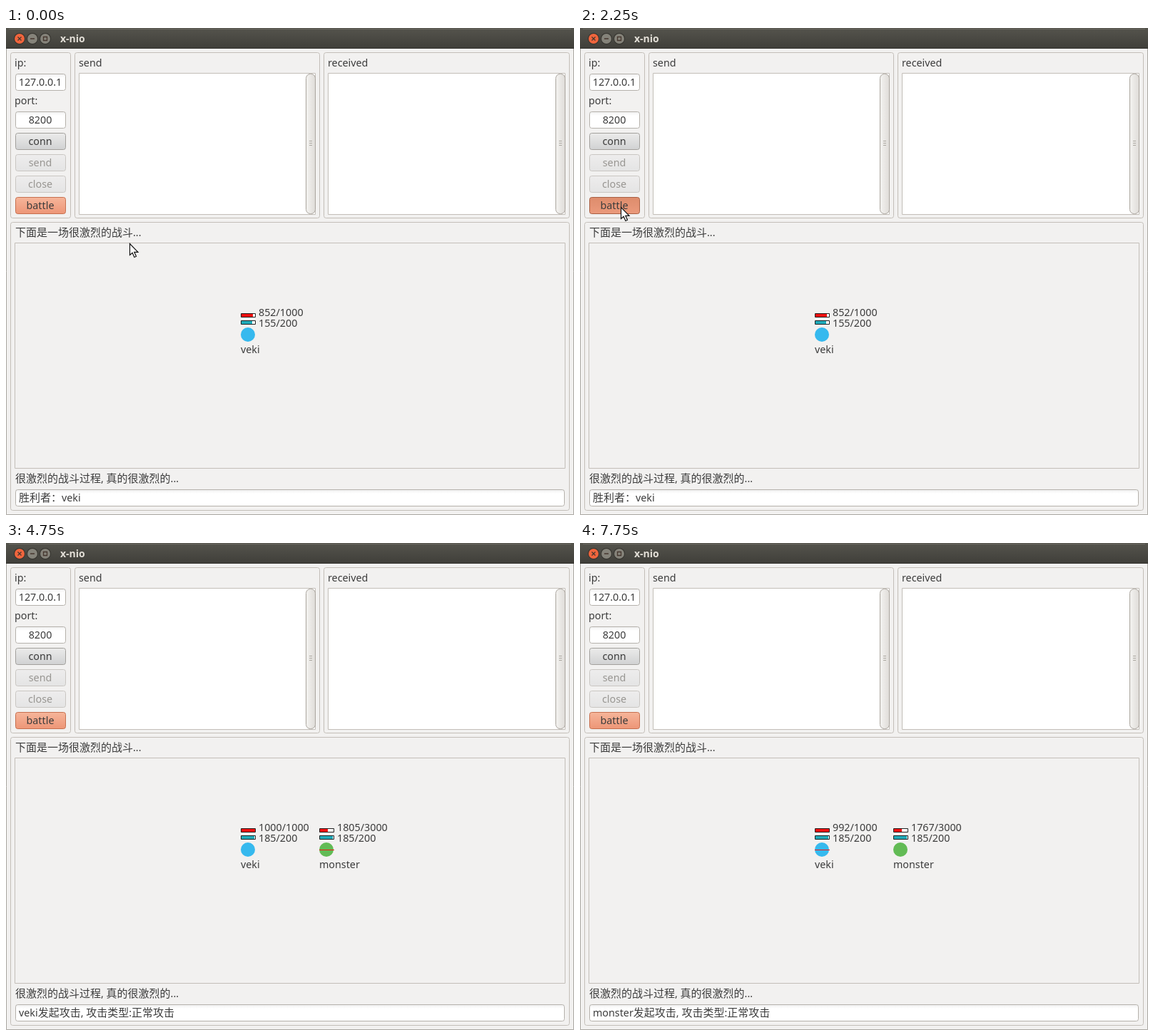
An HTML page with a canvas for the animation above (8 s loop, 796 by 683 pixels).

```html
<!DOCTYPE html>
<html lang="zh">
<head>
<meta charset="utf-8">
<style>
html, body { margin: 0; width: 100%; height: 100%; overflow: hidden; background: #f2f1f0; }
canvas { display: block; }
</style>
</head>
<body>
<canvas id="stage" width="796" height="683"></canvas>
<script>
const ctx = document.getElementById('stage').getContext('2d');
const LOOP = 8000, TAU = Math.PI * 2, HERO = 'veki';
const INK = '#3c3c3c', LINE = '#c3beb8';
const LATIN = '14.3px "Noto Sans", "Open Sans", sans-serif';
const HAN = '15px "Noto Sans CJK SC", "Noto Sans CJK", sans-serif';

const NORMAL = ['#f6b69b', '#ed9576', '#c6704f'];
const HOVER = ['#fbc0a6', '#f5a283', '#cc7a5a'];
const PRESSED = ['#dd8c6c', '#eb9a7c', '#a85f43'];
const PLAIN = ['#ececeb', '#d0d1d2', '#a2a09c'];
const DISABLED = ['#eeeded', '#e4e4e4', '#c9c6c2'];

// Each list is [start time, value]; a value holds until the next start.
const cursorSteps = [[0, [173, 302]], [250, [183, 40]], [500, [208, 9]], [750, [210, 8]],
  [1000, [71, 219]], [1250, [64, 250]], [2250, [57, 251]], [2500, null]];
const buttonSteps = [[0, NORMAL], [750, PLAIN], [1000, NORMAL], [1250, HOVER],
  [1500, PRESSED], [3500, HOVER], [3750, NORMAL]];
const strike = who => who + '发起攻击, 攻击类型:正常攻击';
const battleSteps = [
  [0, { hp: 852, mp: 155, log: '胜利者：' + HERO }],
  [3750, { hp: 1000, mp: 185, foe: 1843, hit: 'hero', storm: true, log: strike('monster') + '  技能id:7' }],
  [4750, { hp: 1000, mp: 185, foe: 1805, hit: 'foe', log: strike(HERO) }],
  [5750, { hp: 996, mp: 185, foe: 1805, hit: 'hero', log: strike('monster') }],
  [6750, { hp: 996, mp: 185, foe: 1767, hit: 'foe', log: strike(HERO) }],
  [7750, { hp: 992, mp: 185, foe: 1767, hit: 'hero', log: strike('monster') }]
];
const at = (steps, t) => steps.filter(s => s[0] <= t).pop()[1];

function text(str, x, y, color = INK, align = 'left') {
  ctx.fillStyle = color;
  const runs = str.match(/[\u3000-\uffef]+|[^\u3000-\uffef]+/g).map(run => {
    const font = run.charCodeAt(0) >= 0x3000 ? HAN : LATIN;
    ctx.font = font;
    return { run, font, width: ctx.measureText(run).width };
  });
  if (align === 'center') x -= runs.reduce((sum, r) => sum + r.width, 0) / 2;
  for (const { run, font, width } of runs) {
    ctx.font = font;
    ctx.fillText(run, x, y);
    x += width;
  }
}

function box(x, y, w, h, r, fill, stroke) {
  ctx.beginPath();
  ctx.roundRect(x + .5, y + .5, w - 1, h - 1, r);
  if (fill) { ctx.fillStyle = fill; ctx.fill(); }
  if (stroke) { ctx.strokeStyle = stroke; ctx.lineWidth = 1; ctx.stroke(); }
}

function gradient(x0, y0, x1, y1, ...colors) {
  const g = ctx.createLinearGradient(x0, y0, x1, y1);
  colors.forEach((c, i) => g.addColorStop(i / (colors.length - 1), c));
  return g;
}

function disc(x, y, r, color) {
  ctx.beginPath();
  ctx.arc(x, y, r, 0, TAU);
  ctx.fillStyle = color;
  ctx.fill();
}

function button(label, y, [top, bottom, edge], color = INK) {
  box(13, y, 71, 24, 3, gradient(0, y, 0, y + 24, top, bottom), edge);
  text(label, 48, y + 17, color, 'center');
}

function entry(x, y, w, h) {
  box(x, y, w, h, 3, gradient(0, y, 0, y + 6, '#eeeeee', '#ffffff'), '#b5b1ab');
}

function titleBar(focused) {
  ctx.fillStyle = gradient(0, 0, 0, 28, '#55544d', '#403f3a');
  ctx.fillRect(0, 0, 796, 29);
  ctx.fillStyle = '#6b6962';
  ctx.fillRect(4, 1, 788, 1);
  ctx.fillStyle = '#34332f';
  ctx.fillRect(0, 28, 796, 1);
  [19, 37, 55].forEach((x, i) => {
    disc(x, 15, 8, '#34332e');
    disc(x, 15, 7, i || !focused ? '#85837a' : '#f0653d');
  });
  ctx.strokeStyle = '#45372f';
  ctx.lineWidth = 1.3;
  ctx.beginPath();
  ctx.moveTo(16.5, 12.5); ctx.lineTo(21.5, 17.5);
  ctx.moveTo(21.5, 12.5); ctx.lineTo(16.5, 17.5);
  ctx.moveTo(34, 15); ctx.lineTo(40, 15);
  ctx.rect(52.5, 12.5, 5, 5);
  ctx.stroke();
  ctx.font = 'bold 14px "Noto Sans", "Open Sans", sans-serif';
  ctx.fillStyle = focused ? '#e3dfd7' : '#98958c';
  ctx.fillText('x-nio', 76, 20);
}

function textArea(label, x, w) {
  box(x - 6, 34, w + 12, 233, 3, null, LINE);
  text(label, x, 54);
  box(x, 63, w, 199, 0, '#ffffff', LINE);
  const bar = x + w - 14;
  box(bar, 64, 14, 197, 6, gradient(bar, 0, bar + 14, 0, '#f5f4f2', '#dedbd7'), '#aaa59e');
  ctx.fillStyle = '#aaa69f';
  for (let y = 158; y < 166; y += 3) ctx.fillRect(bar + 5, y, 4, 1);
}

function gauge(x, y, ratio, color) {
  box(x, y, 21, 6, 0, '#ffffff', '#222222');
  ctx.fillStyle = color;
  ctx.fillRect(x + 1, y + 1, Math.round(19 * ratio), 4);
}

function fighter(x, name, hp, maxHp, mp, color, hit) {
  gauge(x, 400, hp / maxHp, '#f01010');
  gauge(x, 410, mp / 200, '#1fabba');
  text(hp + '/' + maxHp, x + 25, 404);
  text(mp + '/200', x + 25, 419);
  disc(x + 10, 430, 10, color);
  if (hit) {
    ctx.fillStyle = '#f01818';
    ctx.fillRect(x, 430, 21, 1);
  }
  text(name, x, 456);
}

function cursor(x, y) {
  ctx.save();
  ctx.translate(x + .5, y + .5);
  ctx.beginPath();
  [[0, 0], [0, 16], [3.6, 12.8], [6.4, 19], [9, 17.8], [6.3, 11.8], [11.5, 11.8]]
    .forEach(p => ctx.lineTo(...p));
  ctx.closePath();
  ctx.fillStyle = '#ffffff';
  ctx.strokeStyle = '#111111';
  ctx.lineWidth = 1.2;
  ctx.fill();
  ctx.stroke();
  ctx.restore();
}

function paintStorm() {
  const layer = document.createElement('canvas');
  layer.width = 340;
  layer.height = 604;
  const g = layer.getContext('2d');
  let seed = 7;
  const rnd = (a, b) => {
    seed = (seed * 16807) % 2147483647;
    return a + (b - a) * seed / 2147483647;
  };
  const glow = (x, y, rx, ry, ...stops) => {
    g.save();
    g.translate(x, y);
    g.scale(rx, ry);
    const fill = g.createRadialGradient(0, 0, 0, 0, 0, 1);
    stops.forEach((c, i) => fill.addColorStop(i / (stops.length - 1), c));
    g.fillStyle = fill;
    g.fillRect(-1, -1, 2, 2);
    g.restore();
  };
  const arc = (x, y, rx, ry, turn, from, to, color, width) => {
    g.beginPath();
    g.ellipse(x, y, rx, ry, turn, from, to);
    g.strokeStyle = color;
    g.lineWidth = width;
    g.stroke();
  };
  // A band that is widest at the front and thins out toward its ends.
  const band = (x, y, rx, ry, turn, from, to, width) => {
    g.beginPath();
    g.ellipse(x, y, rx, ry, turn, from, to);
    g.ellipse(x, y - width * .4, rx - width, ry - width * .5, turn, to, from, true);
    g.closePath();
    g.shadowColor = '#5548ff';
    g.shadowBlur = 9;
    g.fillStyle = 'rgba(240,240,255,.9)';
    g.fill();
    g.shadowBlur = 0;
  };

  glow(172, 557, 151, 58, '#35c8ff', '#1e9cff', '#1264ff', '#0d42ff', '#1540ff', 'rgba(30,70,255,0)');

  g.filter = 'blur(4px)';
  g.fillStyle = 'rgba(30,88,222,.85)';
  g.beginPath();
  [[48, 350], [95, 331], [160, 320], [205, 322], [258, 313], [318, 319], [325, 338],
    [296, 362], [267, 381], [242, 407], [105, 397], [72, 375]].forEach(p => g.lineTo(...p));
  g.fill();
  const body = g.createLinearGradient(0, 340, 0, 550);
  ['#1c57de', '#2a78ea', '#45b2fa', '#259bf4', '#47baff', 'rgba(50,190,255,.5)']
    .forEach((c, i) => body.addColorStop(i / 5, c));
  g.fillStyle = body;
  g.beginPath();
  g.moveTo(96, 355);
  g.bezierCurveTo(114, 385, 84, 420, 95, 450);
  g.bezierCurveTo(110, 485, 125, 510, 118, 545);
  g.lineTo(225, 545);
  g.bezierCurveTo(212, 500, 245, 475, 239, 430);
  g.bezierCurveTo(229, 400, 248, 380, 253, 350);
  g.fill();
  g.filter = 'none';

  for (let i = 0; i < 85; i++) {
    const x = rnd(32, 190), y = 348 + rnd(-30, 26) * (x / 190), len = rnd(60, 140);
    g.beginPath();
    g.moveTo(x, y);
    g.quadraticCurveTo(x + len * .5, y + rnd(4, 24), Math.min(x + len, 328), y - rnd(0, 16));
    g.strokeStyle = `rgba(${rnd(15, 50) | 0},${rnd(65, 125) | 0},225,${rnd(.12, .4)})`;
    g.lineWidth = rnd(.6, 3.5);
    g.stroke();
  }
  glow(160, 432, 65, 44, 'rgba(120,220,255,.75)', 'rgba(60,180,255,.4)', 'rgba(60,180,255,0)');
  for (let i = 0; i < 42; i++) {
    const from = rnd(0, TAU);
    arc(172 + rnd(-8, 8), rnd(350, 530), rnd(40, 72), rnd(12, 26), rnd(-.2, .1),
      from, from + rnd(.7, 2.4), `rgba(125,220,255,${rnd(.12, .42)})`, rnd(.6, 3));
  }
  for (let i = 0; i < 32; i++) {
    const from = rnd(0, TAU), r = rnd(28, 122);
    arc(172, 553, r, r * .34, 0, from, from + rnd(.6, 2.2),
      `rgba(110,235,255,${rnd(.15, .45)})`, rnd(.7, 3));
  }
  glow(172, 552, 78, 25, 'rgba(190,255,255,.9)', 'rgba(85,225,255,.6)', 'rgba(60,190,255,0)');

  arc(174, 392, 56, 22, -.06, 0, TAU, 'rgba(145,225,255,.8)', 2);
  arc(174, 391, 69, 27, -.12, 2.8, 6.1, 'rgba(180,235,255,.65)', 2);
  arc(158, 351, 49, 10, -.05, 2.8, 5.8, 'rgba(45,185,255,.6)', 3);
  band(172, 547, 137, 51, 0, -.75, 3.95, 7);
  band(173, 475, 125, 38, -.07, -.4, 4.1, 11);
  band(190, 425, 104, 33, -.24, -1.1, 2.75, 9);
  arc(172, 478, 104, 28, -.1, .1, 3.5, 'rgba(225,225,255,.75)', 2);
  arc(160, 502, 87, 31, .08, .2, 3.1, 'rgba(220,235,255,.75)', 3);

  for (let i = 0; i < 92; i++) {
    const right = i < 45;
    const x = right ? rnd(218, 283) : rnd(60, 255);
    const y = right ? rnd(446, 520) : rnd(320, 515);
    const size = rnd(1, 4);
    g.fillStyle = i % 3 ? '#0c4784' : '#1268a8';
    g.beginPath();
    g.moveTo(x - size, y);
    g.lineTo(x + rnd(-1, 2), y - size);
    g.lineTo(x + size, y + rnd(-1, 1));
    g.lineTo(x, y + size);
    g.fill();
  }
  return layer;
}
const storm = paintStorm();

function draw(t) {
  const state = at(battleSteps, t), pointer = at(cursorSteps, t);
  ctx.fillStyle = '#f2f1f0';
  ctx.fillRect(0, 0, 796, 683);
  box(0, 0, 796, 683, 0, null, '#aaa7a2');
  titleBar(t < 750 || t >= 1000);

  box(6, 34, 85, 233, 3, null, LINE);
  text('ip:', 12, 54);
  entry(13, 64, 71, 24);
  text('127.0.0.1', 48, 81, INK, 'center');
  text('port:', 12, 107);
  entry(13, 117, 71, 24);
  text('8200', 48, 134, INK, 'center');
  button('conn', 147, PLAIN);
  button('send', 177, DISABLED, '#989692');
  button('close', 207, DISABLED, '#989692');
  button('battle', 237, at(buttonSteps, t));

  textArea('send', 102, 332);
  textArea('received', 451, 333);

  box(6, 272, 784, 405, 3, null, LINE);
  text('下面是一场很激烈的战斗...', 13, 292);
  box(12, 301, 772, 317, 0, null, LINE);
  if (state.storm) ctx.drawImage(storm, 0, 0);
  fighter(329, HERO, state.hp, 1000, state.mp, '#36b9ee', state.hit === 'hero');
  if (state.foe) fighter(439, 'monster', state.foe, 3000, 185, '#62bb55', state.hit === 'foe');
  text('很激烈的战斗过程, 真的很激烈的...', 13, 637);
  entry(13, 647, 770, 24);
  text(state.log, 18, 664);

  if (pointer) cursor(...pointer);
}

const start = performance.now();
function tick() {
  draw((performance.now() - start) % LOOP);
  requestAnimationFrame(tick);
}
tick();
</script>
</body>
</html>
```
